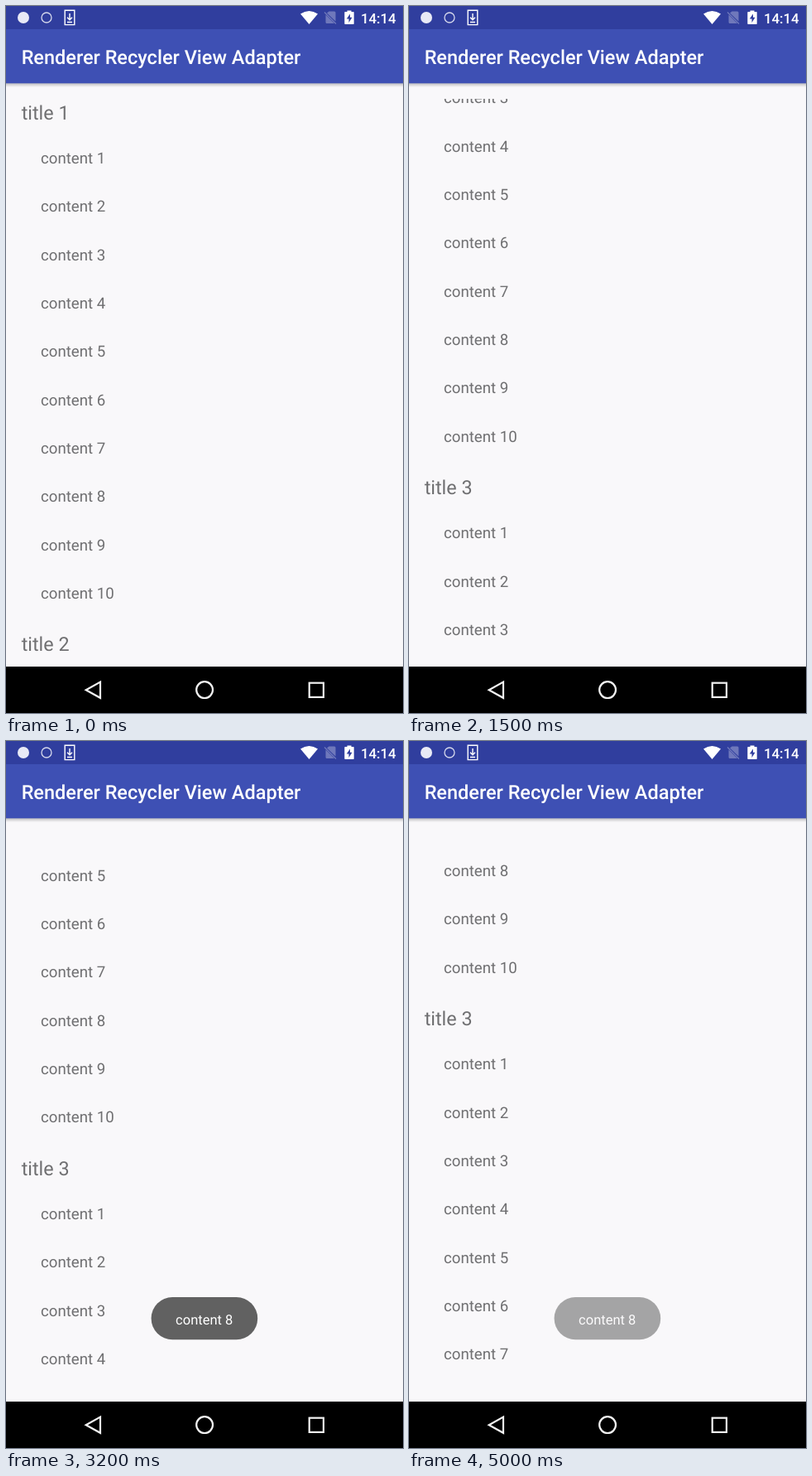
An HTML page that plays this animation: 480 by 853 pixels, repeating every 5.1 s.

```html
<!DOCTYPE html>
<html lang="en">
<head>
<meta charset="utf-8">
<title>Recycler list</title>
<style>
  html, body { margin: 0; width: 100%; height: 100%; overflow: hidden; background: #f9f8fa; }
  svg { display: block; width: 480px; height: 853px; }
  text { font-family: Roboto, sans-serif; text-rendering: geometricPrecision; }
  #list { fill: #6f6f71; font-size: 18.67px; }
  #list .title { font-size: 23.33px; }
  .bar { fill: #fff; font-weight: 500; }
  .nav { fill: none; stroke: #f2f2f2; stroke-width: 2.2; }
  #toast text { fill: #fff; font-size: 16.5px; text-anchor: middle; }
</style>
</head>
<body>
<svg viewBox="0 0 480 853">
  <defs>
    <clipPath id="viewport"><rect x="18" y="112" width="444" height="666.5"/></clipPath>
    <linearGradient id="shadow" x2="0" y2="1">
      <stop stop-color="#000" stop-opacity=".24"/>
      <stop offset="1" stop-color="#000" stop-opacity="0"/>
    </linearGradient>
  </defs>
  <rect width="480" height="853" fill="#f9f8fa"/>
  <g clip-path="url(#viewport)"><g id="list"></g></g>

  <rect y="93" width="480" height="5" fill="url(#shadow)"/>
  <rect width="480" height="93.3" fill="#3e50b4"/>
  <rect width="480" height="28" fill="#303e9e"/>
  <text class="bar" x="18.7" y="70" font-size="23.5">Renderer Recycler View Adapter</text>

  <circle cx="21" cy="14" r="7" fill="#e8eaf6"/>
  <circle cx="49" cy="14" r="6" fill="none" stroke="#d5d8ec" stroke-width="1.3"/>
  <path d="M71.2 5.2h11.6v17.4H71.2z M77 9v7.5 M74 13.7l3 3 3-3 M74 19.5h6" fill="none" stroke="#fff" stroke-width="1.4"/>
  <path d="M356 9.6Q366.5 2.4 377 9.6L366.5 22Z" fill="#fff"/>
  <g opacity=".3">
    <path d="M390.5 6.5H397q1.5 0 1.5 1.5v10.5L388 8.5ZM386.5 10.5L397 21H388q-1.5 0-1.5-1.5Z" fill="#fff"/>
    <path d="M385 7.5L399 21.5" stroke="#fff" stroke-width="1.3"/>
  </g>
  <path d="M412.5 5.5h5v1.5h2.5q.7 0 .7.7v13.6q0 .7-.7.7h-10q-.7 0-.7-.7V7.7q0-.7.7-.7h2.5z" fill="#fff"/>
  <path d="M416 9.5l-4.2 6h2.7v4.5l4-6.2h-2.5z" fill="#303e9e"/>
  <text class="bar" x="429" y="20.5" font-size="16.8">14:14</text>

  <rect y="797" width="480" height="56" fill="#000"/>
  <path class="nav" d="M96.7 825.2L114 815.6V834.8Z"/>
  <circle class="nav" cx="240.1" cy="825.1" r="9.9"/>
  <rect class="nav" x="366.7" y="816.7" width="17.2" height="17.2"/>

  <g id="toast">
    <rect x="175.6" y="671" width="128.6" height="51.3" rx="25.6" fill="#616161"/>
    <text x="239.7" y="704">content 8</text>
  </g>
  <circle id="touch" r="13.2" fill="#fff" fill-opacity=".6" stroke="#c6cae8" stroke-width="1.6"/>
</svg>
<script>
const LOOP = 5100, STEP = 100, ROW = 58.33, SECTION = 641.7;
const [list, toast, touch] = ['list', 'toast', 'touch'].map(id => document.getElementById(id));

function addText(x, y, label, className) {
  const node = document.createElementNS('http://www.w3.org/2000/svg', 'text');
  node.setAttribute('x', x);
  node.setAttribute('y', y);
  node.setAttribute('class', className);
  node.textContent = label;
  list.append(node);
}

for (let s = 0; s < 3; s++) {
  const top = s * SECTION;
  addText(18.7, top + 136.5, `title ${s + 1}`, 'title');
  for (let i = 0; i < 10; i++) addText(42, top + 190 + i * ROW, `content ${i + 1}`, 'content');
}

const clamp = v => Math.min(1, Math.max(0, v));

// Linear interpolation through [time, value] pairs.
function track(keys, t) {
  const next = keys.findIndex(([time]) => time > t);
  if (next < 0) return keys[keys.length - 1][1];
  if (next === 0) return keys[0][1];
  const [[t0, v0], [t1, v1]] = [keys[next - 1], keys[next]];
  return v0 + (v1 - v0) * (t - t0) / (t1 - t0);
}

function scrollAt(t) {
  if (t < 1000) return track([[800, 0], [900, 60], [1000, 232]], t);
  if (t < 4100) return 896.3 - 474.3 * Math.pow(Math.max(0, 1900 - t) / 800, 2.86);
  return track([[4100, 896.3], [4200, 923], [4300, 983], [4400, 1047],
    [4500, 1078], [4600, 1087], [4700, 1080], [4800, 1077]], t);
}

function touchAt(t, scroll) {
  if (t >= 800 && t < 1200) return [track([[800, 255], [1100, 293]], t), t < 900 ? 702 : 688 - scroll];
  if (t >= 2500 && t < 2700) return [265, 337];
  if (t >= 4100 && t < 4800) {
    return [track([[4100, 265], [4400, 309], [4600, 318]], t), t < 4200 ? 471 : 1353 - scroll];
  }
  return null;
}

function toastAlpha(t) {
  const enter = clamp((t - 2722) / 500), leave = clamp((t - 4665) / 500);
  return 1 - (1 - enter) ** 2 - leave ** 2;
}

function draw(now) {
  const t = Math.floor(now % LOOP / STEP) * STEP;
  const scroll = scrollAt(t), finger = touchAt(t, scroll);
  list.setAttribute('transform', `translate(0 ${-scroll})`);
  toast.setAttribute('opacity', toastAlpha(t));
  touch.setAttribute('visibility', finger ? 'visible' : 'hidden');
  if (finger) touch.setAttribute('transform', `translate(${finger})`);
}

const start = performance.now();
function tick() {
  draw(performance.now() - start);
  requestAnimationFrame(tick);
}
tick();
</script>
</body>
</html>
```
